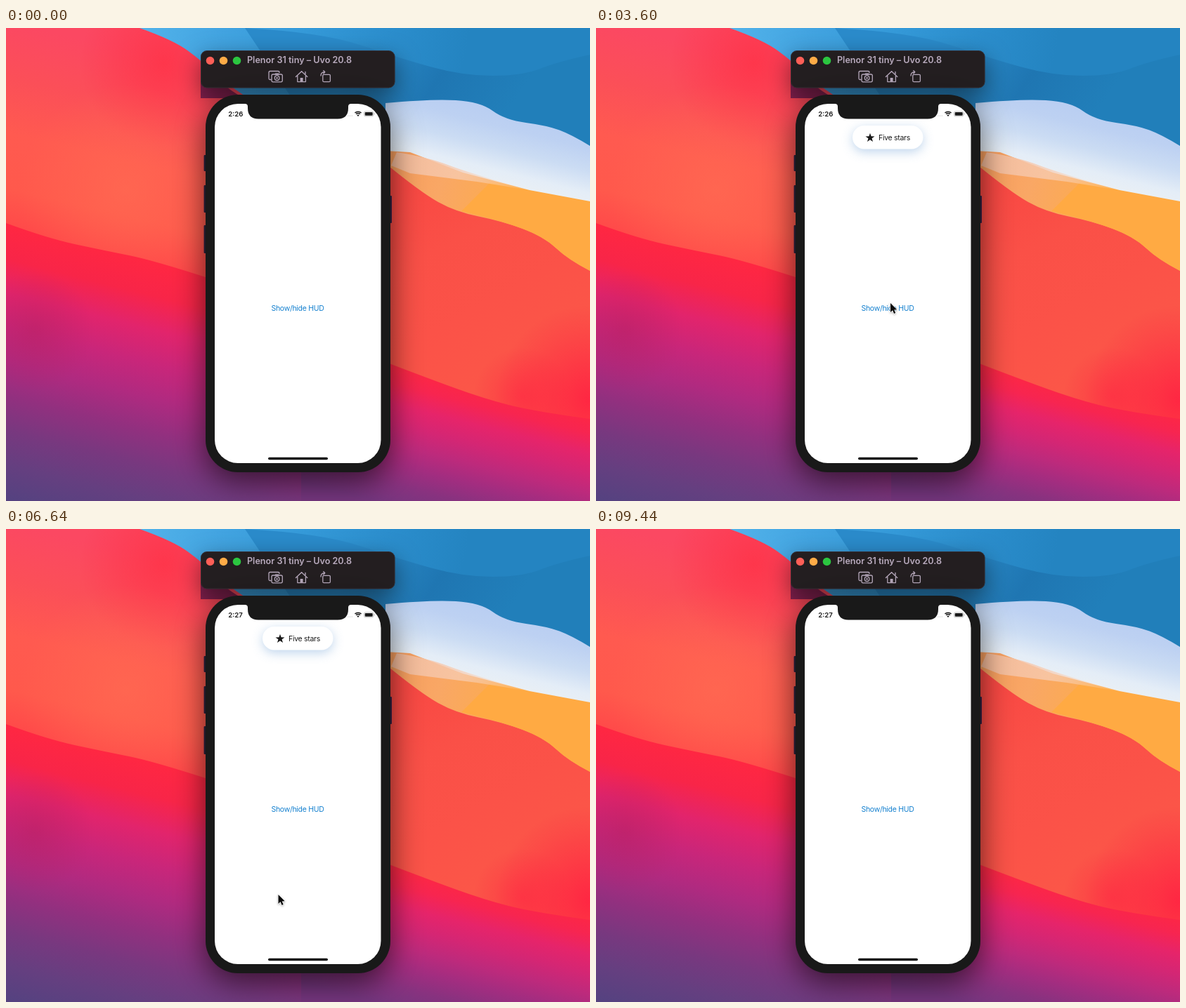
These frames come from a looping animation (831x674 px, 9.52 s). An HTML page with a canvas:

```html
<!DOCTYPE html>
<html lang="en">
<head>
<meta charset="utf-8">
<title>Show/hide HUD</title>
<style>
html, body { margin: 0; width: 100%; height: 100%; overflow: hidden; }
canvas { display: block; }
</style>
</head>
<body>
<canvas id="stage" width="831" height="674"></canvas>
<script>
const W = 831, H = 674, LOOP = 9520, STEP = 80;
const FONT = 'Inter, "Open Sans", sans-serif';
const INK = '#191919', TOOL = '#b8aabd';

const stage = document.getElementById('stage').getContext('2d');
const layer = document.createElement('canvas');
layer.width = W;
layer.height = H;
const still = layer.getContext('2d');

function gradient(c, x0, y0, x1, y1, ...colors) {
  const g = c.createLinearGradient(x0, y0, x1, y1);
  colors.forEach((color, i) => g.addColorStop(i / (colors.length - 1), color));
  return g;
}

function glow(c, x, y, r, color) {
  const g = c.createRadialGradient(x, y, 0, x, y, r);
  g.addColorStop(0, `rgba(${color})`);
  g.addColorStop(1, `rgba(${color.replace(/[^,]+$/, '0')})`);
  c.fillStyle = g;
  c.fillRect(0, 0, W, H);
}

// Smooth curve through the middles of the given points.
function curve(c, pts) {
  c.lineTo(...pts[0]);
  for (let i = 1; i < pts.length - 1; i++) {
    const [x, y] = pts[i], [nx, ny] = pts[i + 1];
    const last = i === pts.length - 2;
    c.quadraticCurveTo(x, y, last ? nx : (x + nx) / 2, last ? ny : (y + ny) / 2);
  }
}

// Area between a curve and a few straight corners.
function wave(c, fill, pts, corners) {
  c.beginPath();
  curve(c, pts);
  corners.forEach(p => c.lineTo(...p));
  c.closePath();
  c.fillStyle = fill;
  c.fill();
}

function box(c, x, y, w, h, r, fill) {
  c.beginPath();
  c.roundRect(x, y, w, h, r);
  if (fill) {
    c.fillStyle = fill;
    c.fill();
  }
}

function disc(c, x, y, r, fill) {
  c.beginPath();
  c.arc(x, y, r, 0, Math.PI * 2);
  c.fillStyle = fill;
  c.fill();
}

function shadow(c, color, blur, dy) {
  c.shadowColor = color;
  c.shadowBlur = blur;
  c.shadowOffsetY = dy;
}

function text(c, str, x, y, size, weight, color, align = 'left', spacing = 0) {
  c.font = `${weight} ${size}px ${FONT}`;
  c.letterSpacing = spacing + 'px';
  c.textAlign = align;
  c.fillStyle = color;
  c.fillText(str, x, y);
}

function drawWallpaper(c) {
  // coral, upper left
  c.fillStyle = gradient(c, 40, 0, -30, 300, '#fb4862', '#fb4f58', '#ff5a50', '#ff594c', '#ff4348');
  c.fillRect(0, 0, W, H);
  glow(c, 225, 50, 120, '255,48,68,.75');
  glow(c, 170, 230, 150, '255,108,82,.65');

  // red to purple, lower left
  wave(c, gradient(c, 0, 280, -92, 647, '#ff2742', '#f82548', '#e2246c', '#c9267a', '#b02a80',
    '#92307f', '#78387f', '#653f80', '#554280'),
    [[0, 278], [60, 300], [140, 317], [210, 331], [290, 357]], [[420, 380], [420, H], [0, H]]);
  glow(c, 40, 432, 85, '175,30,90,.4');

  // blue, top
  wave(c, gradient(c, 190, 0, 640, 100, '#53b3ea', '#42a4e1', '#349ad9', '#2b8ecd', '#2484c1'),
    [[190, 0], [238, 17], [280, 48], [308, 76], [345, 100]], [[560, 130], [W, 190], [W, 0]]);
  wave(c, gradient(c, 520, 20, 700, 140, '#2a8bcb', '#1f76b2', '#217fba'),
    [[340, 0], [450, 6], [560, 43], [650, 68], [735, 68], [785, 48], [W, 38]], [[W, 180], [420, 120]]);
  wave(c, '#83204f', [[277, 50], [300, 72], [318, 88], [338, 100]], [[277, 100]]);

  // coral, right
  wave(c, gradient(c, 547, 240, 690, 500, '#f94843', '#fa5047', '#fb5248', '#fb5648'),
    [[420, 150], [547, 180], [680, 250], [W, 330]], [[W, H], [420, H]]);
  const edge = [[540, 476], [600, 499], [680, 528], [750, 546], [W, 557]];
  glow(c, 831, 530, 135, '255,36,66,.95');
  glow(c, 735, 525, 70, '255,36,66,.55');
  wave(c, gradient(c, 547, 478, 500, 666, '#fe2743', '#f72550', '#e6246a', '#d42674', '#bd2a7c',
    '#a22d80', '#88327f', '#76367f'), edge, [[W, H], [420, H], [420, 440]]);

  // orange band
  wave(c, gradient(c, 560, 200, 740, 250, '#f89f5f', '#f9a765', '#fbaa56', '#ffaa45'),
    [[540, 193], [590, 234], [640, 262], [705, 275], [765, 297], [800, 330], [W, 346]],
    [[W, 220], [650, 180], [540, 170]]);
  wave(c, '#ffaa43',
    [[648, 261], [700, 273], [765, 297], [800, 330], [W, 346]], [[W, 238], [689, 220]]);

  // pale band
  wave(c, gradient(c, 690, 105, 660, 225, '#b8cdf2', '#bdd1f2', '#cbdcf3', '#e4edf7', '#edf1f3'),
    [[540, 107], [605, 101], [675, 105], [710, 131], [770, 139], [805, 152], [W, 168]],
    [[W, 247], [745, 231], [650, 206], [575, 177], [540, 175]]);
  wave(c, gradient(c, 560, 180, 730, 230, 'rgba(244,190,160,.9)', 'rgba(247,205,180,.75)', 'rgba(248,220,200,.2)'),
    [[556, 177], [600, 184], [660, 207], [745, 231]], [[670, 219], [575, 207], [548, 196]]);
}

function drawToolbar(c) {
  c.save();
  shadow(c, 'rgba(0,0,0,.5)', 34, 12);
  box(c, 277, 32, 276.5, 53.5, 9, '#231e20');
  c.restore();
  box(c, 277.5, 32.5, 275.5, 52.5, 8.5);
  c.strokeStyle = 'rgba(80,70,80,.35)';
  c.lineWidth = 1;
  c.stroke();

  ['#ff5f57', '#ffab47', '#2bc640'].forEach((color, i) => disc(c, 290.5 + 19 * i, 46.5, 5.8, color));
  text(c, 'Plenor 31 tiny – Uvo 20.8', 343, 50.3, 12.6, 600, TOOL);

  c.strokeStyle = TOOL;
  c.lineWidth = 1.3;
  c.lineJoin = c.lineCap = 'round';

  // stacked cameras
  c.beginPath();
  c.moveTo(377, 73.5);
  c.lineTo(375.5, 73.5);
  c.quadraticCurveTo(374, 73.5, 374, 72);
  c.lineTo(374, 63.5);
  c.quadraticCurveTo(374, 61.5, 376, 61.5);
  c.lineTo(387, 61.5);
  c.quadraticCurveTo(389, 61.5, 389, 63.5);
  c.stroke();
  box(c, 378, 66, 15.3, 10.8, 2, '#231e20');
  c.stroke();
  box(c, 382.5, 64.5, 6, 2, 1, TOOL);
  disc(c, 385.6, 71.2, 3.3, '#231e20');
  c.stroke();
  disc(c, 385.6, 71.2, 1.2, TOOL);

  // house
  c.beginPath();
  c.moveTo(412.4, 69.5);
  c.lineTo(420.6, 61.8);
  c.lineTo(428.8, 69.5);
  c.moveTo(414.8, 68);
  c.lineTo(414.8, 76.6);
  c.lineTo(426.4, 76.6);
  c.lineTo(426.4, 68);
  c.moveTo(426, 65.5);
  c.lineTo(426, 62.5);
  c.stroke();
  c.fillStyle = TOOL;
  c.fillRect(418.6, 71, 4, 5.6);

  // rotate
  box(c, 450.8, 66.3, 10.6, 10.4, 1.5);
  c.stroke();
  c.beginPath();
  c.moveTo(448, 68);
  c.quadraticCurveTo(448, 62.8, 453.2, 62.8);
  c.moveTo(451.8, 60.8);
  c.lineTo(453.8, 62.8);
  c.lineTo(451.8, 64.8);
  c.stroke();
}

function drawPhone(c) {
  [[181, 23], [224, 39], [281, 40]].forEach(([y, h]) => box(c, 281.6, y, 4, h, 1, '#2c2440'));
  box(c, 545, 239, 4, 39, 1, '#3a2046');
  c.save();
  shadow(c, 'rgba(0,0,0,.62)', 44, 13);
  box(c, 284, 95, 263, 538, 46, INK);
  c.restore();
  box(c, 297, 108, 236.5, 512, 33, '#fff');
}

function drawStatus(c, clock) {
  c.beginPath();
  c.moveTo(338, 107);
  c.lineTo(340, 108);
  c.quadraticCurveTo(344, 108, 344, 112);
  c.lineTo(344, 114);
  c.quadraticCurveTo(344, 129.5, 359, 129.5);
  c.lineTo(472, 129.5);
  c.quadraticCurveTo(487, 129.5, 487, 114);
  c.lineTo(487, 112);
  c.quadraticCurveTo(487, 108, 491, 108);
  c.lineTo(493, 107);
  c.fillStyle = INK;
  c.fill();

  text(c, clock, 316.3, 125.7, 9.6, 600, INK);
  for (let i = 0; i < 4; i++) disc(c, 486.5 + 2 * i, 125, .55, '#bbb');

  // signal fan
  c.strokeStyle = INK;
  c.lineCap = 'butt';
  c.lineWidth = 1.5;
  [6.4, 4].forEach(r => {
    c.beginPath();
    c.arc(501, 125.6, r, -Math.PI * .75, -Math.PI * .25);
    c.stroke();
  });
  c.beginPath();
  c.moveTo(501, 126);
  c.arc(501, 126, 2.4, -Math.PI * .75, -Math.PI * .25);
  c.fillStyle = INK;
  c.fill();

  // battery
  box(c, 509.6, 118.9, 13.2, 7, 2);
  c.strokeStyle = '#aaa';
  c.lineWidth = .7;
  c.stroke();
  box(c, 510.7, 120, 11, 4.8, 1.1, INK);
  box(c, 523.5, 121.2, .9, 2.4, .5, '#aaa');

  box(c, 373, 611.7, 85, 3.6, 1.8, '#111');
}

function drawHud(c, shown) {
  if (shown <= 0) return;
  c.save();
  box(c, 297, 108, 236.5, 512, 33);
  c.clip();
  c.globalAlpha = shown;
  c.translate(0, -40 * (1 - shown));
  c.save();
  shadow(c, 'rgba(110,160,212,.45)', 15, 4);
  box(c, 365, 139, 100.5, 33.5, 16.75, '#fff');
  c.restore();
  c.beginPath();
  for (let i = 0; i < 10; i++) {
    const a = -Math.PI / 2 + i * Math.PI / 5, r = i % 2 ? 2.7 : 6.8;
    c.lineTo(390 + r * Math.cos(a), 156.5 + r * Math.sin(a));
  }
  c.closePath();
  c.fillStyle = INK;
  c.fill();
  text(c, 'Five stars', 402, 160, 10.5, 400, INK, 'left', -.3);
  c.restore();
}

function drawCursor(c, x, y) {
  c.save();
  c.translate(x, y);
  c.beginPath();
  [[0, 0], [0, 13], [3, 10.3], [5.1, 15], [7.2, 14], [5.2, 9.5], [9.2, 9.3]].forEach(p => c.lineTo(...p));
  c.closePath();
  shadow(c, 'rgba(0,0,0,.35)', 3, 1);
  c.lineWidth = 1.4;
  c.lineJoin = 'round';
  c.strokeStyle = '#fff';
  c.stroke();
  c.shadowColor = 'transparent';
  c.fillStyle = '#0a0a0a';
  c.fill();
  c.restore();
}

const clamp = v => Math.min(1, Math.max(0, v));
const ease = v => v * v * (3 - 2 * v);
const ramp = (t, start, length) => ease(clamp((t - start) / length));

const taps = [[1200, 1360], [5360, 5520]];
const HUD_TIME = 3000, HUD_MOVE = 350;
const track = [[320, 400, 690], [960, 419, 392], [5920, 419, 392], [6640, 387.5, 521], [7200, 372, 690]];

function hudShown(t) {
  return taps.reduce((sum, [, up]) =>
    sum + ramp(t, up, HUD_MOVE) - ramp(t, up + HUD_TIME, HUD_MOVE), 0);
}

function linkAlpha(t) {
  return Math.min(...taps.map(([down, up]) =>
    t < down ? 1 : .22 + .78 * clamp((t - up) / 240)));
}

function cursorAt(t) {
  for (let i = 1; i < track.length; i++) {
    const [t0, x0, y0] = track[i - 1], [t1, x1, y1] = track[i];
    if (t >= t0 && t <= t1) {
      const k = ramp(t, t0, t1 - t0);
      return [x0 + (x1 - x0) * k, y0 + (y1 - y0) * k];
    }
  }
  return null;
}

function draw(t) {
  const c = stage;
  c.drawImage(layer, 0, 0);
  drawHud(c, hudShown(t));
  drawStatus(c, t < 4480 ? '2:26' : '2:27');

  c.globalAlpha = linkAlpha(t);
  text(c, 'Show/hide HUD', 415, 403.3, 10.5, 400, '#1580cf', 'center', -.3);
  c.globalAlpha = 1;

  if (taps.some(([down, up]) => t >= down && t < up)) {
    disc(c, 419, 393.5, 12.6, 'rgba(222,196,188,.82)');
    c.strokeStyle = '#98a0ae';
    c.lineWidth = 1.2;
    c.stroke();
  }
  const cursor = cursorAt(t);
  if (cursor) drawCursor(c, ...cursor);
}

drawWallpaper(still);
drawToolbar(still);
drawPhone(still);

const begin = performance.now();
function tick() {
  const t = (performance.now() - begin) % LOOP;
  draw(Math.floor(t / STEP) * STEP);
  requestAnimationFrame(tick);
}
tick();
</script>
</body>
</html>
```
